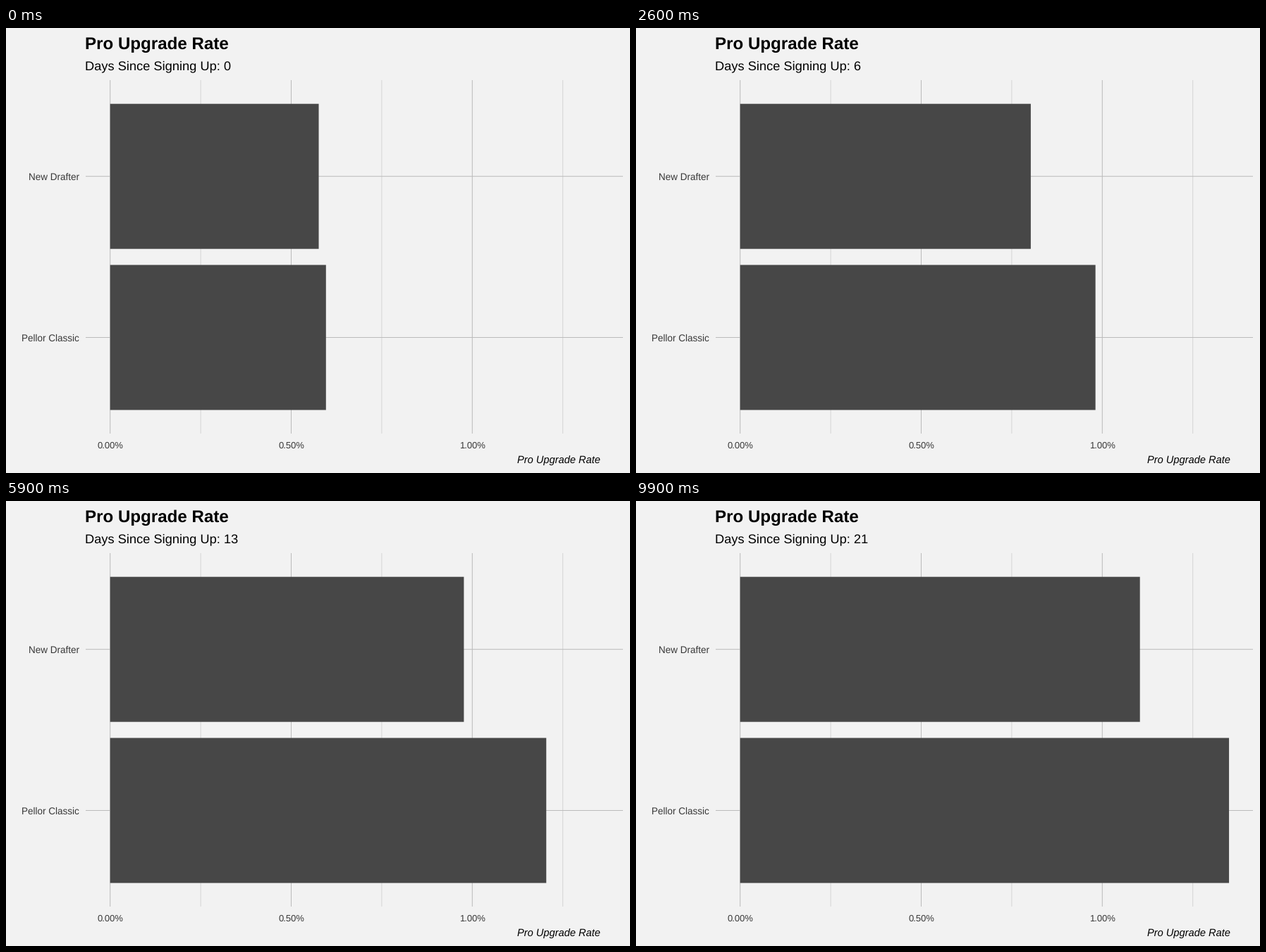
Animation of 885x632 px, one loop 10 s. Source, as a matplotlib script:

```python
import numpy as np
import matplotlib.pyplot as plt
from matplotlib.animation import FuncAnimation
from matplotlib.patches import Rectangle

W, H, DPI = 885, 632, 64
FRAMES, INTERVAL, LAST_DAY = 100, 100, 21
PX = 72 / DPI  # points per pixel

BG, BAR, INK = "#f2f2f2", "#474747", "#383838"
MAJOR, MINOR = "#bbbbbb", "#d5d5d5"
ZERO, PERCENT = 147.7, 513.6  # x of 0 % and pixels per 1 %
BAR_H = 206

# Rates in percent on a few key days, linear in between
KEY_DAYS = [0, 2, 7, 9, 16, 21]
ROWS = [
    ("New Drafter", 210.7, [0.576, 0.721, 0.837, 0.902, 1.051, 1.104]),
    ("Pellor Classic", 439.5, [0.596, 0.797, 1.059, 1.130, 1.278, 1.350]),
]

plt.rcParams["font.family"] = "Liberation Sans"
plt.rcParams["text.hinting"] = "none"
plt.rcParams["text.hinting_factor"] = 8

fig = plt.figure(figsize=(W / DPI, H / DPI), dpi=DPI, facecolor=BG)
ax = fig.add_axes([0, 0, 1, 1])
ax.set_xlim(0, W)
ax.set_ylim(H, 0)
ax.axis("off")


def line(xs, ys, color):
    ax.plot(xs, ys, color=color, lw=PX, solid_capstyle="butt",
            snap=False, zorder=1)


def label(x, y, text, size, color="black", **kw):
    return ax.text(x, y, text, fontsize=size * PX, color=color,
                   va="baseline", **kw)


def add_row(name, y):
    line([113, 875], [y, y], MAJOR)
    label(104, y + 5.2, name, 13.5, INK, ha="right")
    return ax.add_patch(Rectangle((ZERO, y - BAR_H / 2), 0, BAR_H, fc=BAR,
                                  lw=0, zorder=2, snap=False))


for k in range(6):
    rate = k / 4
    x = ZERO + PERCENT * rate
    major = k % 2 == 0
    line([x, x], [74, 576], MAJOR if major else MINOR)
    if major:
        label(x, 596.4, f"{rate:.2f}%", 13, INK, ha="center")

label(112.5, 29.8, "Pro Upgrade Rate", 24.1, weight="bold")
subtitle = label(112.5, 59.3, "", 18.2)
label(843, 617.8, "Pro Upgrade Rate", 14.6, ha="right", style="italic")
bars = [add_row(name, y) for name, y, _ in ROWS]


def update(i):
    day = i * LAST_DAY / (FRAMES - 1)
    for bar, (_, _, rates) in zip(bars, ROWS):
        bar.set_width(PERCENT * np.interp(day, KEY_DAYS, rates))
    subtitle.set_text(f"Days Since Signing Up: {round(day)}")
    return *bars, subtitle


anim = FuncAnimation(fig, update, frames=FRAMES, interval=INTERVAL,
                     repeat=True, repeat_delay=0, blit=False)
plt.show()
```
